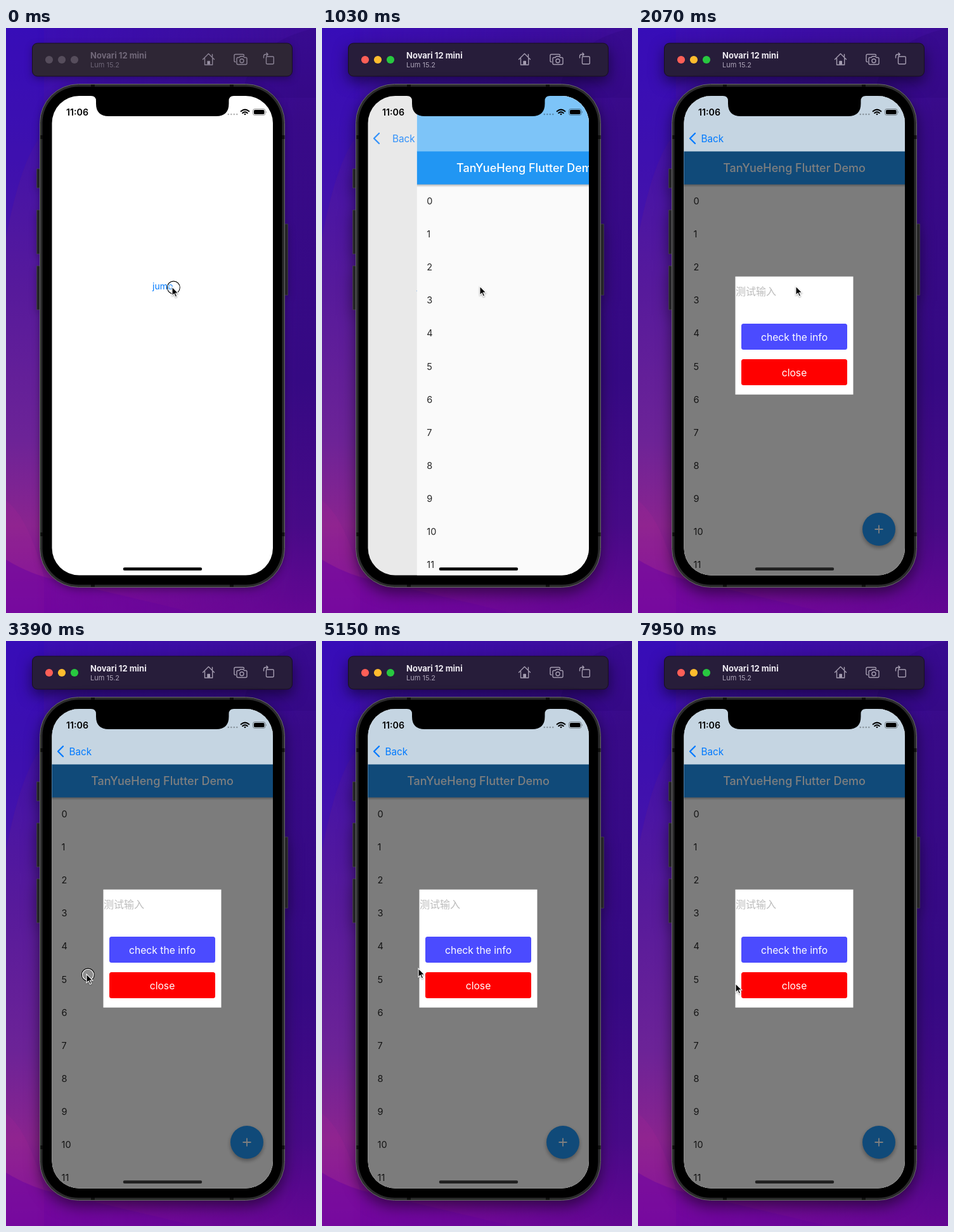
These frames come from a looping animation (489 by 922 pixels, 8000 ms). An HTML page:

```html
<!DOCTYPE html>
<html lang="en">
<head>
<meta charset="utf-8">
<title>Modal dialog demo</title>
<style>
html, body { margin: 0; width: 100%; height: 100%; overflow: hidden; background: #35098a; }
svg { display: block; width: 489px; height: 922px; }
text { font-family: Inter, "Noto Sans CJK SC", "Noto Sans CJK", sans-serif; }
.line { fill: none; stroke-linecap: round; stroke-linejoin: round; }
.mid { text-anchor: middle; }
.shade { filter: drop-shadow(0 4px 6px rgba(0,0,0,.3)); }
.on .shade { filter: drop-shadow(0 9px 11px rgba(0,0,0,.5)); }
#bar > rect { fill: #2e2635; }
.on #bar > rect { fill: #271d3a; }
#bar .name { fill: #716879; }
.on #bar .name { fill: #eeebf2; }
#bar .sub { fill: #6c6475; }
.on #bar .sub { fill: #aaa2b6; }
#bar .line { stroke: #8b8395; stroke-width: 1.4; }
.on #bar .line { stroke: #a59db1; }
#bar circle.light { fill: #564d5c; }
.on #bar circle.light { fill: var(--c); }
</style>
</head>
<body>
<svg id="stage" viewBox="0 0 489 922">
  <defs>
    <linearGradient id="west" x2="0" y2="1">
      <stop stop-color="#3b0eb4"/><stop offset=".2" stop-color="#4312a8"/>
      <stop offset=".45" stop-color="#571a9b"/><stop offset=".7" stop-color="#6c2397"/>
      <stop offset=".85" stop-color="#8a248f"/><stop offset="1" stop-color="#7b099c"/>
    </linearGradient>
    <linearGradient id="east" x2="0" y2="1">
      <stop stop-color="#3d0d98"/><stop offset=".15" stop-color="#380a88"/>
      <stop offset=".6" stop-color="#350983"/><stop offset=".85" stop-color="#470a87"/>
      <stop offset="1" stop-color="#640693"/>
    </linearGradient>
    <linearGradient id="fade">
      <stop offset=".1" stop-color="#000"/><stop offset=".95" stop-color="#fff"/>
    </linearGradient>
    <mask id="across"><rect width="489" height="922" fill="url(#fade)"/></mask>
    <linearGradient id="under" x2="0" y2="1">
      <stop stop-opacity=".3"/><stop offset="1" stop-opacity="0"/>
    </linearGradient>
    <clipPath id="glass"><rect x="72.5" y="107" width="348.5" height="755.5" rx="43"/></clipPath>
  </defs>

  <!-- wallpaper -->
  <rect width="489" height="922" fill="url(#west)"/>
  <path d="M0 330Q25 200 60 165V0H0Z" fill="#300cc0" opacity=".3"/>
  <path d="M0 745Q35 770 60 865V922H0Z" fill="#a02494" opacity=".25"/>
  <path d="M0 838Q40 862 80 870L300 922H0Z" fill="#6a02a4" opacity=".5"/>
  <rect width="489" height="922" fill="url(#east)" mask="url(#across)"/>
  <path d="M376 90Q395 20 489 0V110H376Z" fill="#2b067a" opacity=".25"/>

  <!-- simulator toolbar -->
  <g id="bar" class="shade">
    <rect x="41.5" y="24" width="410" height="52" rx="8" stroke="#18101f"/>
    <circle class="light" cx="68" cy="50" r="6.1" style="--c:#fe5f57"/>
    <circle class="light" cx="88" cy="50" r="6.1" style="--c:#febc2e"/>
    <circle class="light" cx="108" cy="50" r="6.1" style="--c:#28c840"/>
    <text class="name" x="133" y="48" font-size="13" font-weight="700">Novari 12 mini</text>
    <text class="sub" x="133" y="62" font-size="11">Lum 15.2</text>
    <g class="line">
      <path d="M310.5 49.5L319.5 40.5L328.500 49.500M325.500 45V41.500M313.500 48V58H325.700V48"/>
      <path d="M318 57V52.500H321.300V57Z" fill="#a59db1"/>
      <path d="M362 53.500Q360 53.500 360 51.500V43.500Q360 41.500 362 41.500H373.500Q375.500 41.500 375.500 43.500"/>
      <path d="M366 46.500H368L369.500 44.800H374.500L376 46.500H378Q380 46.500 380 48.500V55.500Q380 57.500 378 57.500H366Q364 57.500 364 55.500V48.500Q364 46.500 366 46.500Z"/>
      <circle cx="372" cy="51.800" r="3"/>
      <rect x="410.500" y="45" width="11.800" height="11.800" rx="1.500"/>
      <path d="M406.500 47V45Q406.500 41.500 410 41.500H413M411 39.300L413.200 41.500L411 43.700"/>
    </g>
  </g>

  <!-- phone body -->
  <g class="shade">
    <path d="M48.500 222H56V252H48.500ZM48.500 287H56V356H48.500ZM48.500 375H56V444H48.500ZM436 309H444.500V421H436Z" fill="#242426" stroke="#48484a" stroke-width=".7"/>
    <rect x="53.500" y="88.500" width="386" height="793" rx="61" fill="#2b2b2c" stroke="#69696a"/>
    <path d="M54 172H59M54 798H59M435 172H439.500M435 798H439.500M137 89V94M356 89V94M137 877V881M356 877V881" stroke="#111" stroke-width="6"/>
    <rect x="57.500" y="92.500" width="378" height="785" rx="57"/>
  </g>

  <g clip-path="url(#glass)">
    <rect x="72" y="107" width="349" height="756" fill="#fff"/>
    <text id="jump" x="231" y="411.500" font-size="14" fill="#007aff">jump</text>
    <rect id="cover" x="72" y="107" width="349" height="756"/>

    <g id="page">
      <rect x="72" y="107" width="349" height="756" fill="#fafafa"/>
      <g id="list" font-size="14.500" fill="#262626"></g>
      <rect x="72" y="246" width="349" height="5" fill="url(#under)"/>
      <rect x="72" y="194" width="349" height="52.500" fill="#2196f3"/>
      <text class="mid" x="246.500" y="227" font-size="18" font-weight="500" fill="#fff">TanYueHeng Flutter Demo</text>
      <g style="filter:drop-shadow(0 3px 3px rgba(0,0,0,.35))">
        <circle cx="380" cy="790" r="26" fill="#2196f3"/>
      </g>
      <path d="M373.500 790H386.500M380 783.500V796.500" stroke="#fff" stroke-width="1.800"/>
      <rect id="dim" x="72" y="107" width="349" height="756" opacity=".5"/>
      <rect id="nav" x="72" y="107" width="349" height="87.500"/>
    </g>

    <g id="back" fill="#007aff">
      <path class="line" d="M90 166L82 174L90 182" stroke="#007aff" stroke-width="2.300"/>
      <text id="label" x="99.500" y="179.700" font-size="15.300">Back</text>
    </g>

    <g id="dialog">
      <rect x="153.500" y="391.700" width="186" height="186" fill="#fff"/>
      <text x="154" y="421" font-size="16" fill="#bcbcbc">测试输入</text>
      <rect x="163" y="466" width="167" height="41" rx="3.500" fill="#4b4bff"/>
      <rect x="163" y="522" width="167" height="41" rx="3.500" fill="#f00"/>
      <g class="mid" font-size="15.700" fill="#fff">
        <text x="246.500" y="492.500">check the info</text>
        <text x="246.500" y="548.500">close</text>
      </g>
    </g>

    <!-- status bar and home indicator -->
    <text x="95" y="137.500" font-size="14.200" font-weight="600">11:06</text>
    <path d="M350.800 136H366" stroke="#000" stroke-opacity=".3" stroke-width="2.600" stroke-linecap="round" stroke-dasharray="0 4.500"/>
    <g class="line" stroke="#000" stroke-width="2.100" stroke-linecap="butt">
      <path d="M370.700 131.300Q377 125.800 383.300 131.300M373.200 134Q377 130.800 380.800 134"/>
      <path d="M375.200 135.500L377 137.500L378.800 135.500Q377 134 375.200 135.500Z" fill="#000" stroke="none"/>
    </g>
    <rect x="389.500" y="127.500" width="19.500" height="10" rx="3" fill="none" stroke="#000" stroke-opacity=".4"/>
    <rect x="391" y="129" width="16.500" height="7" rx="1.700"/>
    <path d="M410.200 130.800Q412 132.500 410.200 134.200Z" opacity=".45"/>
    <rect id="home" x="184.700" y="850.300" width="124.500" height="4.700" rx="2.350"/>
  </g>
  <path d="M134 106V107Q142 107 142 115V119Q142 139 162 139H331.500Q351.500 139 351.500 119V115Q351.500 107 359.500 107V106Z"/>

  <!-- pointer -->
  <g id="pointer">
    <g id="ring" fill="none">
      <circle cx="2.300" cy="1" r="9.900" fill="#fff" fill-opacity=".15" stroke="#000" stroke-width="1.200"/>
      <circle cx="2.300" cy="1" r="8.800" stroke="#fff" stroke-width="1.100"/>
    </g>
    <path d="M0 0V13.800L3.200 10.900L5.400 16L7.700 15L5.500 10H9.900Z" stroke="#fff" stroke-width="1.100" style="filter:drop-shadow(0 1px 1px rgba(0,0,0,.35))"/>
  </g>
</svg>
<script>
const LOOP = 8000, STEP = 147.2, WIDTH = 349;
const el = id => document.getElementById(id);
const show = (id, on) => el(id).style.display = on ? "" : "none";

for (let i = 0; i < 12; i++)
  el("list").innerHTML += `<text x="87.500" y="${278 + 52.1 * i}">${i}</text>`;

// pointer stops: step, x, y
const path = [
  [3, 262, 408], [5, 249, 407], [16, 249, 407], [22, 129, 523], [23, 127, 525],
  [24, 127, 526], [27, 127, 420], [28, 128, 420], [31, 133, 526], [32, 133, 526],
  [33, 137, 519], [34, 146, 508], [35, 152, 516], [37, 153, 526], [39, 153, 526],
  [41, 153, 438], [43, 153, 528], [44, 153, 528], [46, 154, 540]
];
// step ranges with the button held
const presses = [[0, 0], [23, 28], [39, 42], [48, 48], [50, 51], [53, 53]];

function pointerAt(n) {
  const i = path.findIndex(p => p[0] >= n);
  if (i < 0) return path.at(-1).slice(1);
  if (i === 0) return path[0].slice(1);
  const a = path[i - 1], b = path[i], k = (n - a[0]) / (b[0] - a[0]);
  return [a[1] + (b[1] - a[1]) * k, a[2] + (b[2] - a[2]) * k];
}

// critically damped push transition: 1 = off screen, 0 = settled
function pushLeft(n) {
  if (n >= 10) return 0;
  const x = Math.max(0, .014 * (n * STEP - 827));
  return (1 + x) * Math.exp(-x);
}

function navColour(n, modal) {
  if (modal) return "#c5d5e2";
  return n < 8 ? "#7dc4f8" : n === 8 ? "#a8dcfb" : n === 9 ? "#c5ebfd" : "#d5f4ff";
}

function draw(t) {
  const n = Math.floor((t + 7) / STEP), modal = t >= 2070;
  const left = pushLeft(n), x = left * WIDTH;
  el("stage").classList.toggle("on", n >= 4);
  show("page", left < 1);
  el("page").setAttribute("transform", `translate(${x})`);
  el("jump").setAttribute("transform", `translate(${-.3 * WIDTH * (1 - left)})`);
  el("cover").setAttribute("opacity", .11 * (1 - left));
  el("nav").setAttribute("fill", navColour(n, modal));
  el("back").setAttribute("opacity", 1 - left);
  el("label").setAttribute("x", 99.5 + .147 * x);
  el("home").setAttribute("fill", modal ? "#202020" : "#000");
  show("dim", modal);
  show("dialog", modal);
  show("ring", presses.some(([a, b]) => n >= a && n <= b));
  el("pointer").setAttribute("transform", `translate(${pointerAt(n)})`);
}

const start = performance.now();
function tick() {
  draw((performance.now() - start) % LOOP);
  requestAnimationFrame(tick);
}
tick();
</script>
</body>
</html>
```
